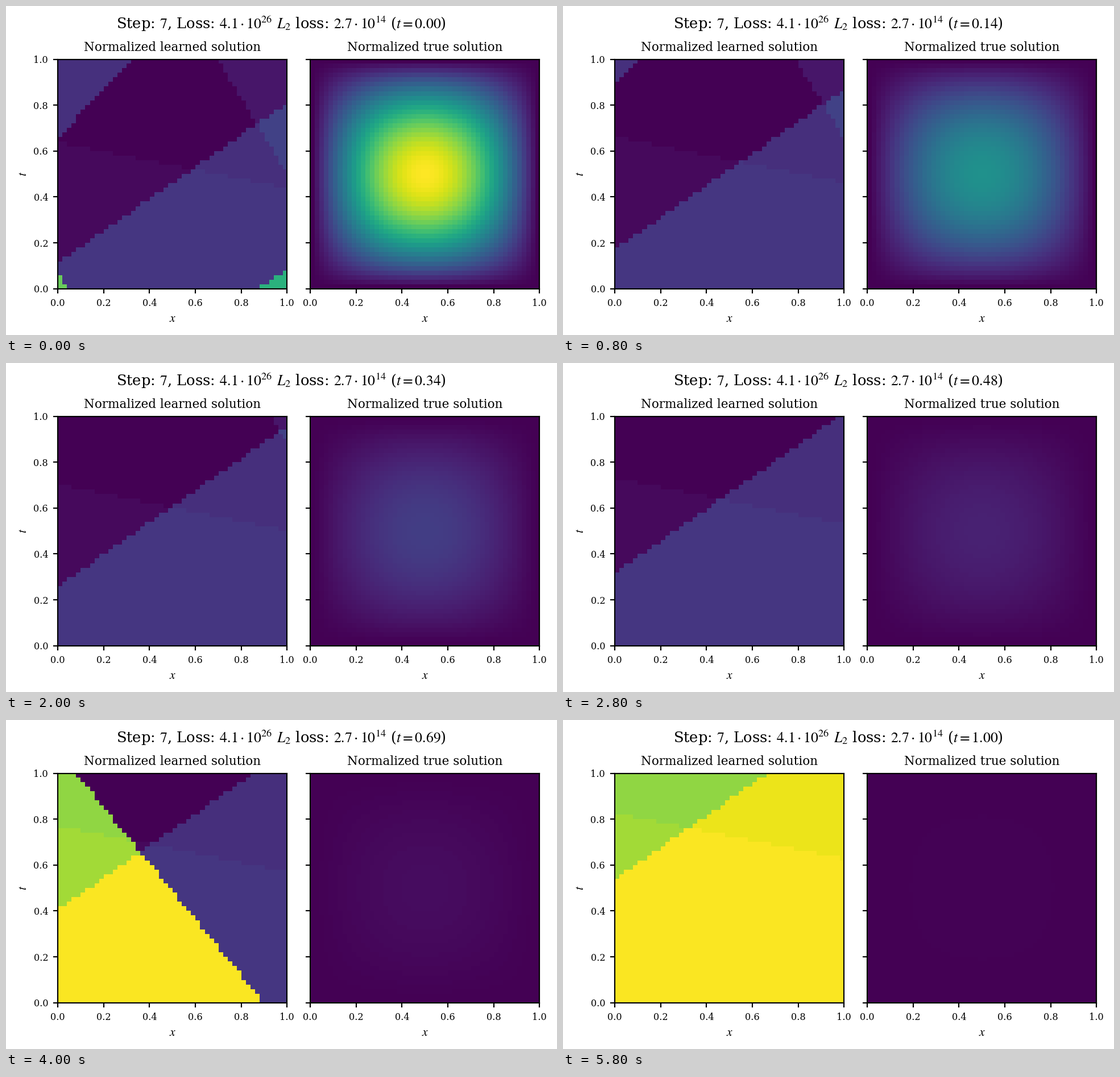
A matplotlib script for the animation above (6000 ms loop, 969 by 578 pixels).

```python
import numpy as np
import matplotlib.pyplot as plt
from matplotlib.animation import FuncAnimation

W, H, DPI = 969, 578, 194
FRAMES, INTERVAL, N = 30, 200, 50
SIDE, BOTTOM = 403, 81.3

plt.rcParams.update({
    "font.family": "DejaVu Serif",
    "mathtext.fontset": "stix",
    "font.size": 8,
    "axes.titlesize": 8,
    "axes.labelsize": 8,
    "axes.titlepad": 5.3,
    "axes.labelpad": 2.9,
    "xtick.labelsize": 6,
    "ytick.labelsize": 6,
    "xtick.major.size": 3.1,
    "ytick.major.size": 3.1,
    "xtick.major.pad": 3.2,
    "ytick.major.pad": 3.2,
})

mid = (np.arange(N) + 0.5) / N
X, Y = np.meshgrid(mid, mid)
wave = np.sin(np.pi * np.linspace(0, 1, N))
MODE = np.outer(wave, wave)


def learned(s):
    """Piecewise constant field: a weighted sum of moving half planes."""
    planes = [
        (0.135, Y < 0.113 + 0.696 * X + 0.4235 * s),
        (0.025, Y < 0.6375 - 0.2 * X + 0.19 * s),
        (0.14, Y > 0.655 + 1.06 * X + 1.7 * s),
        (0.06, Y > 0.99 - 1.63 * (X - 0.70 - 0.67 * s)),
        (0.48, Y < 0.01 + 0.66 * (X - 0.88 - 1.09 * s)),
        (0.61, Y < 0.07 - 1.7 * X - 1.3 * s),
        (0.835, Y < 0.99 - 1.22 * (X - 0.086 - 4.452 * (s - 20 / 29))),
    ]
    return sum(weight * side for weight, side in planes)


def true(s):
    return MODE * np.exp(-np.pi ** 2 / 2 * s)


def heading(s):
    return (r"Step: $7$, Loss: $4.1\cdot 10^{26}$ $L_2$ loss: "
            rf"$2.7\cdot 10^{{14}}$ ($t={s:.2f}$)")


fig = plt.figure(figsize=((W + 0.01) / DPI, (H + 0.01) / DPI), dpi=DPI,
                 facecolor="white")


def panel(left, title, field):
    ax = fig.add_axes([left / W, BOTTOM / H, SIDE / W, SIDE / H])
    img = ax.imshow(field(0), cmap="viridis", vmin=0, vmax=1, origin="lower",
                    extent=(0, 1, 0, 1), aspect="auto",
                    interpolation="nearest")
    ticks = np.linspace(0, 1, 6)
    ax.set_xticks(ticks)
    ax.set_yticks(ticks)
    ax.set_title(title)
    ax.set_xlabel("$x$")
    return ax, img


ax_left, img_left = panel(91.2, "Normalized learned solution", learned)
ax_right, img_right = panel(535.2, "Normalized true solution", true)
ax_left.set_ylabel("$t$")
ax_right.tick_params(labelleft=False)
head = fig.text(484 / W, 1 - 39.8 / H, heading(0), size=9.58,
                ha="center", va="baseline")


def update(i):
    s = i / (FRAMES - 1)
    img_left.set_data(learned(s))
    img_right.set_data(true(s))
    head.set_text(heading(s))
    return img_left, img_right, head


anim = FuncAnimation(fig, update, frames=FRAMES, interval=INTERVAL,
                     repeat=True, repeat_delay=0, blit=False)
plt.show()
```
